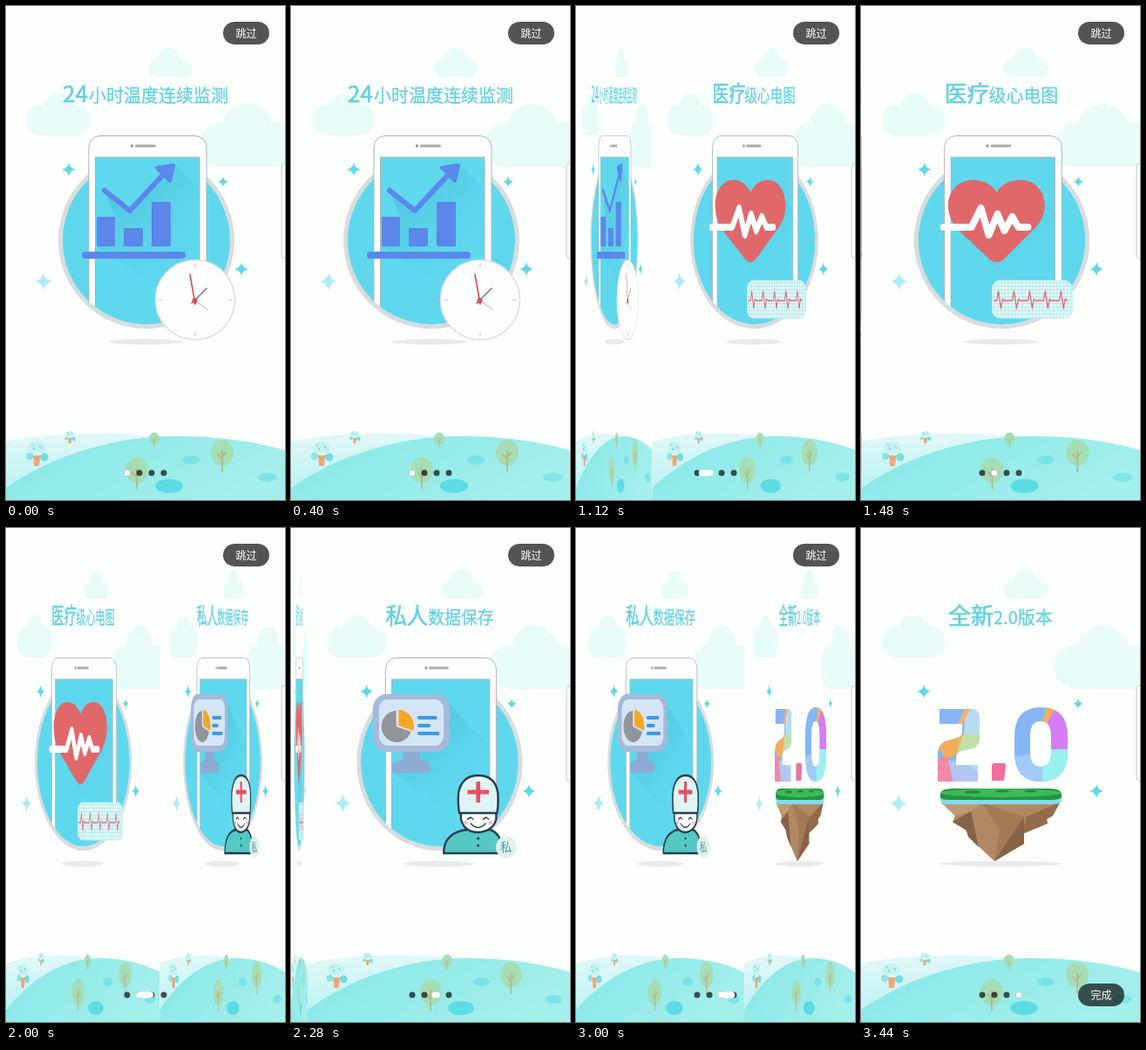
Animation of 320 by 565 pixels, one loop 3480 ms. Source, as an HTML page:

```html
<!DOCTYPE html>
<html lang="zh">
<head>
<meta charset="utf-8">
<style>
html, body { margin: 0; width: 100%; height: 100%; overflow: hidden; background: #fcfffc; }
svg { display: block; width: 320px; height: 565px; }
text { font-family: "Noto Sans CJK SC", "Noto Sans CJK", "Noto Sans", sans-serif; }
.title { font-size: 20px; fill: #65d0e2; stroke: #65d0e2; stroke-width: .3; }
.big { font-size: 26px; stroke-width: .7; }
.button rect { fill: #000; fill-opacity: .67; }
.button text { font-size: 12px; fill: #fff; text-anchor: middle; }
.line { fill: none; stroke-linecap: round; stroke-linejoin: round; }
</style>
</head>
<body>
<svg viewBox="0 0 320 565">
<defs>
  <linearGradient id="hill" y2=".4"><stop stop-color="#84e8e7"/><stop offset="1" stop-color="#a4eeec"/></linearGradient>
  <linearGradient id="farHill" x2="0" y2="1"><stop stop-color="#e2f8f7"/><stop offset="1" stop-color="#b5f1f2"/></linearGradient>
  <linearGradient id="shade" x2=".8" y2="1"><stop stop-color="#2f9fba" stop-opacity=".5"/><stop offset="1" stop-color="#5fd8ee" stop-opacity="0"/></linearGradient>
  <pattern id="grid" width="4" height="4" patternUnits="userSpaceOnUse"><path d="M0 0H4M0 0V4" stroke="#8edfe3"/></pattern>
  <clipPath id="phoneArea"><path d="M0 0H320V268H257A96 96 0 0 1 65 268H0Z"/></clipPath>
  <clipPath id="digits"><path clip-rule="evenodd" d="M90 207H126Q136 207 136 218V240Q136 251 124 253L115 255Q109 257 109 263V271H134V290H88V259Q88 246 100 243L111 240Q116 238 116 233V224H90ZM153 269H163Q166 269 166 272L164 289H150V273Q150 269 153 269ZM206 205Q237 205 237 239V256Q237 290 206 290Q176 290 176 256V239Q176 205 206 205ZM206 221Q194 221 194 238V257Q194 273 206 273Q218 273 218 257V238Q218 221 206 221Z"/></clipPath>
  <path id="star" d="M0-8Q1.2-1.2 8 0Q1.2 1.2 0 8Q-1.2 1.2-8 0Q-1.2-1.2 0-8Z"/>
  <g id="tree">
    <ellipse rx="13" ry="15" fill="#a5ddb4"/>
    <path class="line" d="M0-2V21M0 8L-5 2M0 5L4 0" stroke="#b9b58a" stroke-width="1.700"/>
  </g>
  <g id="paleTree">
    <path d="M-10 1Q-12-9 0-10Q12-9 10 1Q5 5 0 2Q-5 5-10 1Z" fill="#c4f2f0"/>
    <circle cx="-8" cy="7" r="4" fill="#8be3e5"/><circle cx="9" cy="8" r="4.500" fill="#6fdde2"/>
    <path d="M-4-3L-2 0M3-5L5-2M-6-7L-4-5" stroke="#4fc6cf"/>
    <path d="M-4 6H5L3 18H-3Z" fill="#eeae82"/>
    <path d="M-4 6L0 10L5 6M0 10V18" class="line" stroke="#d99a6d"/>
  </g>
  <g id="scene">
    <rect width="320" height="565" fill="#fcfffc"/>
    <g fill="#e8fcf9">
      <circle cx="60" cy="118" r="18"/><rect x="24" y="113" width="72" height="35" rx="16"/>
      <circle cx="188" cy="62" r="14"/><rect x="163" y="62" width="51" height="19" rx="9"/>
      <circle cx="277" cy="141" r="29"/><rect x="222" y="134" width="130" height="50" rx="24"/>
    </g>
    <path d="M0 498C45 489 100 487 145 490Q200 493 240 505V565H0Z" fill="url(#farHill)"/>
    <path d="M0 551C55 513 125 492 195 492Q265 492 320 508V565H0Z" fill="url(#hill)"/>
    <g fill="#5cdce4"><ellipse cx="187" cy="549" rx="16" ry="8"/>
      <g opacity=".55"><ellipse cx="212" cy="519" rx="10" ry="5"/><ellipse cx="300" cy="539" rx="11" ry="5"/></g></g>
    <use href="#tree" transform="translate(150 531)"/>
    <use href="#tree" transform="translate(170 495)scale(.48)"/>
    <use href="#tree" transform="translate(248 511)"/>
    <use href="#paleTree" transform="translate(35 508)"/>
    <use href="#paleTree" transform="translate(73 491)scale(.5)"/>
    <g fill="#5fd8e8">
      <use href="#star" transform="translate(72 187)"/>
      <use href="#star" transform="translate(249 201)scale(.75)"/>
      <use href="#star" transform="translate(270 301)"/>
      <use href="#star" transform="translate(43 315)scale(1.25)" opacity=".5"/>
    </g>
  </g>
  <g id="phone">
    <use href="#scene"/>
    <ellipse cx="160" cy="384" rx="43" ry="3.200" fill="#e8ebea"/>
    <circle cx="161" cy="268" r="98.500" fill="#5fd8ee" stroke="#d9dcdd" stroke-width="5"/>
    <g clip-path="url(#phoneArea)" stroke="#adb3b5">
      <rect x="95" y="148.500" width="135" height="240" rx="13" fill="#fdfffe"/>
      <rect x="102.500" y="173" width="119.500" height="220" fill="#5fd8ee"/>
    </g>
    <circle cx="144.500" cy="160" r="1.700" fill="#999"/><rect x="148" y="158.500" width="24" height="3" rx="1.500" fill="#aaa"/>
  </g>
</defs>

<g class="page">
  <use href="#phone"/>
  <text class="title" x="65" y="110"><tspan class="big">24</tspan><tspan x="95">小时温度连续监测</tspan></text>
  <path d="M193 181L222 210V300L190 330L104 275H125V241L113 211L142 234Z" fill="url(#shade)"/>
  <g fill="#5b87ea" stroke="#5b87ea" stroke-linejoin="round">
    <path d="M105 242h19v32h-19zM136 255h20v19h-20zM168 225h20v49h-20z" stroke-width="2"/>
    <path class="line" d="M91 285H202" stroke-width="8"/>
    <path class="line" d="M113 211L142 234L183 190" stroke-width="6"/>
    <path d="M173 185L192 182L188 200Z" stroke-width="4"/>
  </g>
  <circle cx="217" cy="336" r="45.500" fill="#fcfefd" stroke="#dcdfe0" stroke-width="1.500"/>
  <path d="M217 294v5M217 373v5M175 336h5M254 336h5" stroke="#c5c9ca"/>
  <path class="line" d="M217 337L231 347" stroke="#ccc" stroke-width="1.500"/>
  <path class="line" d="M213 340L230 323" stroke="#777" stroke-width="1.500"/>
  <path class="line" d="M217 341L211 307" stroke="#e3484c" stroke-width="1.600"/>
  <circle cx="216.500" cy="337" r="3" fill="#e3484c"/>
</g>

<g class="page">
  <use href="#phone"/>
  <text class="title" x="95" y="110"><tspan class="big">医疗</tspan><tspan x="146">级心电图</tspan></text>
  <path d="M200 212L222 234V315L170 315L112 258Z" fill="url(#shade)"/>
  <path d="M146 289L110 255C90 233 99 199 128 199Q146 199 155 213Q164 199 182 199C211 199 219 233 200 253L164 289Q155 297 146 289Z" fill="#e0686b"/>
  <path class="line" d="M94 253H126L137 231L146 262L156 238L164 257L173 241L180 253H191" stroke="#fff" stroke-width="8"/>
  <rect x="150" y="314" width="92" height="43" rx="9" fill="#e6f8f7"/>
  <rect x="150" y="314" width="92" height="43" rx="9" fill="url(#grid)" stroke="#c9efee"/>
  <path class="line" d="M152 337h3l2-11 3 20 2-11 2 2h9l2-11 3 20 2-11 2 2h9l2-11 3 20 2-11 2 2h9l2-11 3 20 2-11 2 2h9l2-11 3 20 2-11 2 2" stroke="#e06873" stroke-width="1.300"/>
</g>

<g class="page">
  <use href="#phone"/>
  <text class="title" x="95" y="110"><tspan class="big">私人</tspan><tspan x="147">数据保存</tspan></text>
  <path d="M172 200L222 250V300L180 330L103 279Z" fill="url(#shade)"/>
  <path d="M116 250H137V265Q149 266 150 272V276Q150 280 145 280H108Q103 280 103 276V272Q104 266 116 265Z" fill="#8eabd3"/>
  <rect x="79.500" y="190" width="94" height="66" rx="17" fill="#a5b9da"/>
  <rect x="87" y="196" width="79" height="53" rx="11" fill="#d5e5f8"/>
  <path d="M108 227V209A18.500 18 0 1 0 126 233Z" fill="#919599"/>
  <path d="M111 226V208A19 19 0 0 1 129 232Z" fill="#f9a622"/>
  <path class="line" d="M136 217H156M136 226H148M136 235H159" stroke="#3c98ea" stroke-width="4"/>
  <g stroke="#233d54" stroke-width="2.500" stroke-linejoin="round">
    <path d="M166 372Q166 348 195 345H222Q237 349 238 372Z" fill="#54c8c3"/>
    <path d="M187 324V333Q191 348 208 348Q226 347 230 333V324Z" fill="#fff"/>
    <path d="M185 326Q183 316 184 303Q188 283 208 283Q229 283 232 303Q233 316 231 326Z" fill="#dff4f4"/>
    <path class="line" d="M195 333l4-2 3 2M214 333l4-2 3 2M199 338Q208 347 217 338" stroke-width="1.400"/>
  </g>
  <path d="M208 290V314M195 302H221" stroke="#e75262" stroke-width="5"/>
  <g fill="#f8bcb8"><circle cx="193" cy="337" r="2.500"/><circle cx="223" cy="337" r="2.500"/></g>
  <g fill="#233d54"><circle cx="208" cy="355" r="1.500"/><circle cx="208" cy="363" r="1.500"/></g>
  <circle cx="242" cy="365" r="12.500" fill="#e1efef"/>
  <text x="242" y="370" font-size="14" fill="#349fa9" text-anchor="middle">私</text>
</g>

<g class="page">
  <use href="#scene"/>
  <text class="title" x="100" y="110"><tspan class="big">全新</tspan><tspan x="152">2.0版本</tspan></text>
  <ellipse cx="160" cy="384" rx="70" ry="3" fill="#e8ebea"/>
  <g clip-path="url(#digits)">
    <path d="M85 200H240V295H85Z" fill="#86b6f6"/>
    <path d="M120 200L140 205V238L118 236Z" fill="#b9dcf4"/>
    <path d="M119 205L126 205L117 224L111 226Z" fill="#f4ae78"/>
    <path d="M112 236L140 236V256L108 258Z" fill="#c3dfa8"/>
    <path d="M86 247L117 236L110 258L98 266Z" fill="#f4ad5a"/>
    <path d="M86 264L100 262L106 290H86Z" fill="#f08aa6"/>
    <path d="M100 266L140 268V295L106 292Z" fill="#b3c6f3"/>
    <path d="M118 268H140V284Z" fill="#a5e3ee"/>
    <path d="M148 266H168V292H148Z" fill="#f0709a"/>
    <path d="M216 202H240V254H212Z" fill="#d67cf4"/>
    <path d="M213 205L222 207L213 224L208 222Z" fill="#f6ae59"/>
    <path d="M212 253H240V292H204Z" fill="#98f1ec"/>
    <path d="M174 262L196 258L208 272V292H174Z" fill="#a3c9f8"/>
  </g>
  <path d="M92 314H228L220 329L213 333L214 338L185 350L187 361L153 381L123 353L121 346L105 336L108 329Z" fill="#b08962"/>
  <path d="M228 314L220 329L213 333L214 338L185 350L190 330Z" fill="#936b4b"/>
  <path d="M140 315L187 330L187 361L153 381L159 345Z" fill="#a37a55"/>
  <path d="M105 336L126 324L135 365L123 353L121 346ZM187 330L187 361L153 381Z" fill="#876246"/>
  <path d="M92 314H140L126 324L108 329Z" fill="#c09a72"/>
  <path d="M91 306H230V311Q229 316 220 316H100Q92 316 91 311Z" fill="#80dcee"/>
  <path d="M91 304Q92 298 105 298H216Q229 298 230 304V308Q228 311 218 311H102Q92 311 91 308Z" fill="#23943f"/>
  <ellipse cx="160.500" cy="303" rx="69" ry="5" fill="#3cba57"/>
  <g fill="#218b3b"><ellipse cx="128" cy="302" rx="9" ry="1.700"/><ellipse cx="162" cy="301" rx="8" ry="1.500"/><ellipse cx="194" cy="301" rx="7" ry="1.500"/></g>
</g>

<g fill="#000" fill-opacity=".67"><circle cx="139" cy="534" r="3.500"/><circle cx="153" cy="534" r="3.500"/><circle cx="167" cy="534" r="3.500"/><circle cx="181" cy="534" r="3.500"/></g>
<rect id="marker" y="530.500" height="7" rx="3.500" fill="#fff"/>
<rect x="316" y="180" width="12" height="109" rx="3" fill="#fbfdfc" stroke="#c6cccb"/>
<g class="button" id="skip"><rect x="249" y="18" width="53" height="26" rx="13"/><text x="275.500" y="35.500">跳过</text></g>
<g class="button" id="done"><rect x="249" y="521" width="53" height="26" rx="13"/><text x="275.500" y="538.500">完成</text></g>
</svg>
<script>
const LOOP = 3480, STEP = 40, WIDTH = 320;
const swipes = [[756, 784], [1753, 748], [2826, 560]]; // start, duration
const pages = document.querySelectorAll('.page');
const [marker, skip, done] = ['marker', 'skip', 'done'].map(id => document.getElementById(id));
const clamp = v => Math.min(1, Math.max(0, v));

// cubic-bezier(.4, 0, .2, 1)
function ease(x) {
  if (x <= 0 || x >= 1) return clamp(x);
  let low = 0, high = 1, u;
  for (let i = 0; i < 24; i++) {
    u = (low + high) / 2;
    const v = 1 - u;
    if (1.2 * u * v * v + .6 * u * u * v + u ** 3 < x) low = u; else high = u;
  }
  return u * u * (3 - 2 * u);
}

function draw(now) {
  const time = Math.floor(now % LOOP / STEP) * STEP;
  const position = swipes.reduce((sum, [start, length]) => sum + ease((time - start) / length), 0);
  const edge = i => WIDTH * clamp(i - position);

  pages.forEach((page, i) => {
    const left = edge(i), width = edge(i + 1) - left;
    page.style.display = width > .01 ? '' : 'none';
    page.setAttribute('transform', `translate(${left} 0) scale(${width / WIDTH} 1)`);
  });

  const markerWidth = 7 + 13 * Math.abs(Math.sin(Math.PI * position));
  marker.setAttribute('width', markerWidth);
  marker.setAttribute('x', 139 + 14 * position - markerWidth / 2);

  const last = position > 2.5;
  skip.style.display = last ? 'none' : '';
  done.style.display = last ? '' : 'none';
  requestAnimationFrame(() => draw(performance.now() - origin));
}

const origin = performance.now();
draw(0);
</script>
</body>
</html>
```
